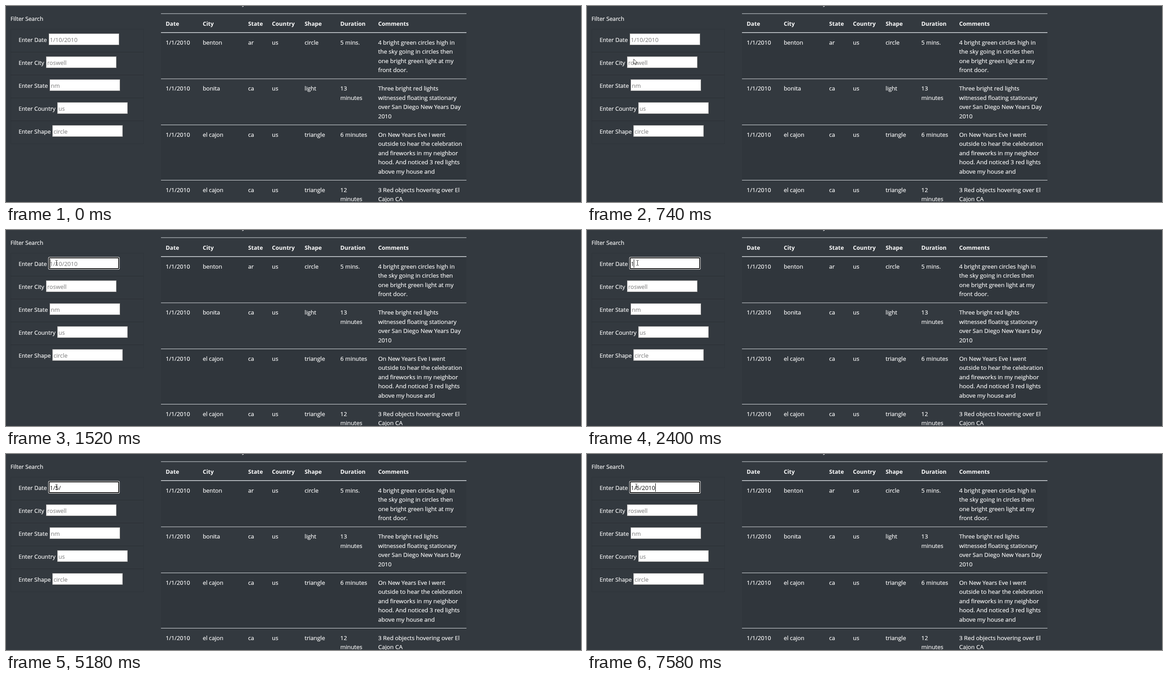
An HTML page for the animation above (8 s loop, 1280 by 436 pixels).

```html
<!DOCTYPE html>
<html lang="en">
<head>
<meta charset="utf-8">
<title>Filter Search</title>
<style>
  html, body { margin: 0; width: 100%; height: 100%; overflow: hidden; background: #33393f; }
  svg { display: block; }
  text { font: 13px "Open Sans", "Noto Sans", sans-serif; fill: #fff; stroke: #fff; stroke-width: .2px; white-space: pre; }
  .label { font-size: 12.7px; }
  .head { font-size: 12.6px; font-weight: 700; stroke: none; }
  .cell { font-size: 12.85px; }
  .hint { fill: #757575; stroke: none; }
  #value { fill: #111; stroke: none; }
  .stripe { fill: #000; fill-opacity: .05; }
  .rule { fill: #dee2e6; }
  .frame { fill: none; stroke: #000; stroke-opacity: .09; }
  .box { fill: #fff; stroke: #8a8a8a; }
</style>
</head>
<body>
<svg id="stage" width="1280" height="436" viewBox="0 0 1280 436">
  <g id="table"></g>
  <g id="form"></g>
  <g id="focus">
    <rect x="94" y="60" width="159" height="28" rx="3" fill="#fff"/>
    <rect x="95" y="61" width="157" height="26" rx="2" fill="#101010"/>
    <rect x="97" y="63" width="153" height="22" fill="#fff"/>
  </g>
  <text id="hint" class="hint" x="97.6" y="80">1/10/2010</text>
  <text id="value" x="97.6" y="80"></text>
  <rect id="caret" y="65" width="1" height="19" fill="#000"/>
  <path id="arrow" d="M0 0V11.3L2.6 8.9L4.3 12.7L6.1 11.9L4.5 8.2H8Z" fill="#fff" stroke="#000" stroke-width=".8"/>
  <path id="beam" d="M-2.5 -5.5H-.5M.5 -5.5H2.5M0 -5V5M-2.5 5.5H-.5M.5 5.5H2.5" fill="none" stroke="#222"/>
</svg>
<script>
const LOOP = 8000;
const $ = id => document.getElementById(id);

function add(parent, tag, attrs, content = "") {
  const node = document.createElementNS("http://www.w3.org/2000/svg", tag);
  for (const key in attrs) node.setAttribute(key, attrs[key]);
  node.textContent = content;
  parent.append(node);
  return node;
}
const label = (parent, x, y, content, cls = "") => add(parent, "text", { x, y, class: cls }, content);
const rect = (parent, x, y, width, height, cls) => add(parent, "rect", { x, y, width, height, class: cls });

// Results table
const columns = [355.5, 438, 539, 592, 664.7, 744.3, 828.5];
const header = ["Date", "City", "State", "Country", "Shape", "Duration", "Comments"];
const rows = [
  { top: 59.5, cells: ["1/1/2010", "benton", "ar", "us", "circle", "5 mins.",
    "4 bright green circles high in|the sky going in circles then|one bright green light at my|front door."] },
  { top: 162, cells: ["1/1/2010", "bonita", "ca", "us", "light", "13|minutes",
    "Three bright red lights|witnessed floating stationary|over San Diego New Years Day|2010"] },
  { top: 264.5, cells: ["1/1/2010", "el cajon", "ca", "us", "triangle", "6 minutes",
    "On New Years Eve I went|outside to hear the celebration|and fireworks in my neighbor|hood. And noticed 3 red lights|above my house and"] },
  { top: 387.5, cells: ["1/1/2010", "el cajon", "ca", "us", "triangle", "12|minutes",
    "3 Red objects hovering over El|Cajon CA"] }
];

function buildTable() {
  const table = $("table");
  label(table, 525.5, -1.5, "y");
  rows.forEach((row, i) => {
    const bottom = i < 3 ? rows[i + 1].top : 436;
    if (i % 2 === 0) rect(table, 345, row.top, 680, bottom - row.top, "stripe");
    row.cells.forEach((cell, c) => cell.split("|").forEach((line, n) =>
      label(table, columns[c], Math.round(row.top + 26.2 + n * 20.45), line, c && c < 6 ? "cell" : "")));
    if (i) rect(table, 345, row.top - .5, 680, 1, "rule");
  });
  header.forEach((name, c) => label(table, columns[c], 44, name, "head"));
  rect(table, 345, 16.5, 680, 1, "rule");
  rect(table, 345, 58.5, 680, 1.5, "rule");
}

// Filter form: name, input left edge, placeholder
const fields = [
  ["Date", 95, ""], ["City", 89, "roswell"], ["State", 97, "nm"],
  ["Country", 114, "us"], ["Shape", 103, "circle"]
];

function buildForm() {
  const form = $("form");
  label(form, 10, 33, "Filter Search", "label");
  fields.forEach(([name, x, hint], i) => {
    const y = i * 51;
    rect(form, 10.5, y + 51.5, 295.5, 51, "frame");
    label(form, 28, y + 80, "Enter " + name, "label");
    rect(form, x + .5, y + 61.5, 156, 25, "box");
    label(form, x + 2.8, y + 80, hint, "hint");
  });
}

// Pointer spots and typed keys hold from their time on
const pointer = [
  [200, 1062, 392], [280, 760, 296], [360, 430, 214], [430, 218, 166], [510, 141, 153],
  [590, 122, 138], [670, 104, 118], [750, 86, 102], [830, 77, 90], [900, 88, 80],
  [980, 107, 70], [1050, 107, 73], [1520, 112, 73.5], [7120, 111, 73], [7200, 110, 73], [7280, 109.5, 72.5]
];
const keys = [[2400, "1"], [3640, "/"], [4250, "5"], [4630, "/"], [5410, "2"], [5640, "0"], [5960, "1"], [6580, "0"]];
const caretOff = [[1750, 2250], [2940, 3470], [4170, 4250], [5180, 5410], [6490, 6580], [7120, 7580]];
const focusAt = 1220, beamAt = 980;

const last = (list, t) => list.filter(entry => entry[0] <= t).pop();
const show = (node, on) => node.setAttribute("visibility", on ? "visible" : "hidden");

function draw(t) {
  const typed = keys.filter(key => key[0] <= t).map(key => key[1]);
  $("value").textContent = typed.join("");
  show($("hint"), !typed.length);
  show($("focus"), t >= focusAt);

  const resting = caretOff.some(([from, to]) => t >= from && t < to);
  show($("caret"), t >= focusAt && !resting);
  const caretX = typed.reduce((x, char) => x + (char === "/" ? 5.5 : 7.3), typed.length ? 97.4 : 98);
  $("caret").setAttribute("x", Math.floor(caretX));

  const spot = last(pointer, t);
  const isBeam = t >= beamAt;
  show($("arrow"), spot && !isBeam);
  show($("beam"), spot && isBeam);
  if (spot) {
    const node = isBeam ? $("beam") : $("arrow");
    node.setAttribute("transform", `translate(${spot[1] + (isBeam ? .5 : 0)} ${Math.floor(spot[2])})`);
  }
}

buildTable();
buildForm();
const start = performance.now();
function tick() {
  draw((performance.now() - start) % LOOP);
  requestAnimationFrame(tick);
}
tick();
</script>
</body>
</html>
```
